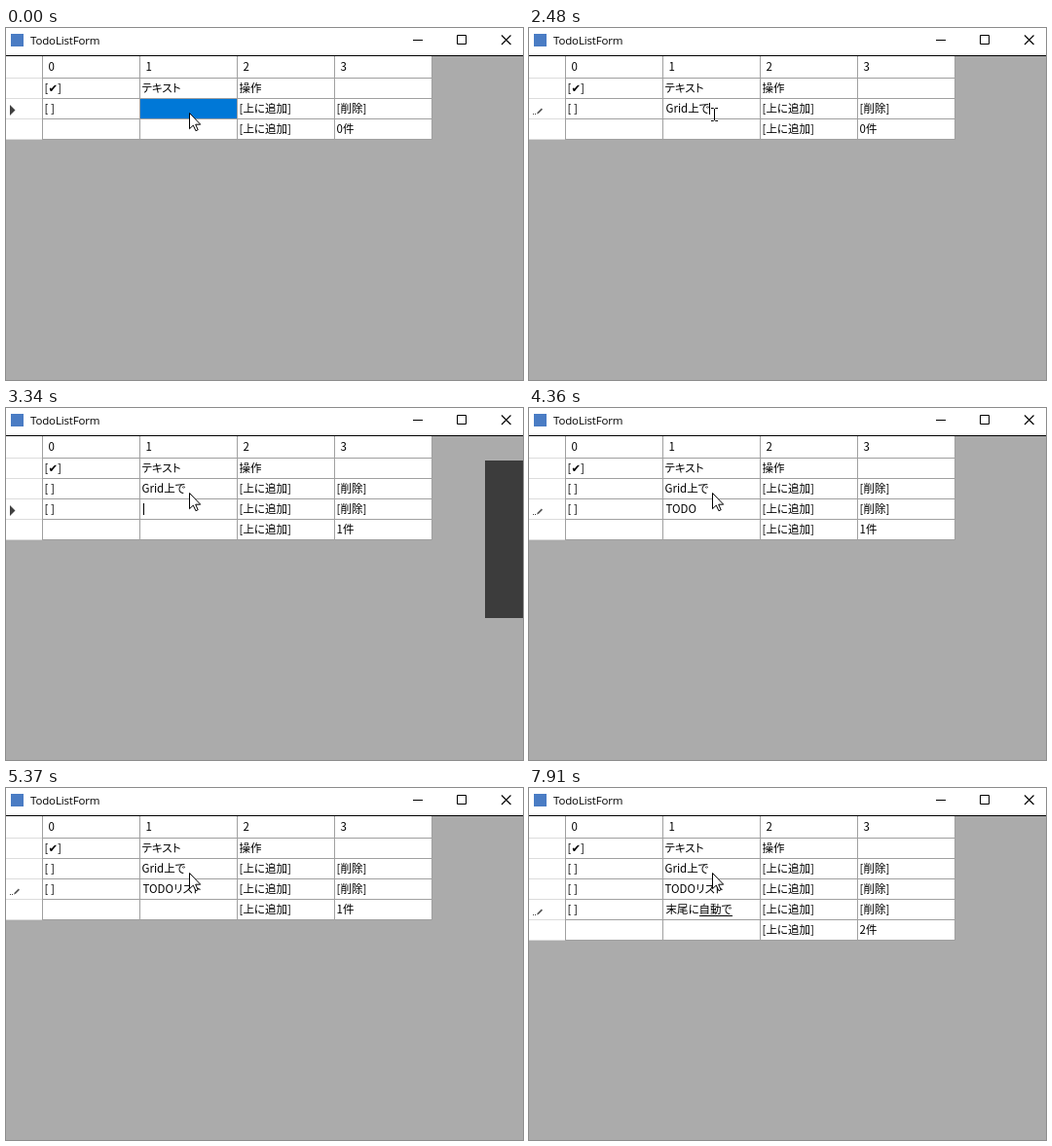
An HTML page for the animation above (7.99 s loop, 531 by 362 pixels).

```html
<!DOCTYPE html>
<html lang="ja">
<head>
<meta charset="utf-8">
<style>
  html, body { margin: 0; height: 100%; overflow: hidden; background: #ababab; }
  svg { display: block; }
  text {
    font: 11.5px "Noto Sans CJK JP", "Noto Sans CJK", "DejaVu Sans", sans-serif;
    font-feature-settings: "palt";
    white-space: pre;
  }
  .title { font: 11.5px "Open Sans", "Noto Sans", sans-serif; letter-spacing: -.15px; }
  rect { shape-rendering: crispEdges; }
</style>
</head>
<body>
<svg width="531" height="362" viewBox="0 0 531 362">
  <rect width="531" height="28" fill="#fff"/>
  <rect y="28" width="531" height="1" fill="#000"/>
  <rect x="5" y="6" width="13" height="13" fill="#4a7cc4"/>
  <text class="title" x="25" y="17">TodoListForm</text>
  <g fill="none" stroke="#000">
    <path d="M418 12.5h10M463.5 7.5h9v9h-9z"/>
    <path d="M509 7.5l9.5 9.5m0-9.5l-9.5 9.5" stroke-width="1.1"/>
  </g>
  <g id="grid"></g>
  <g id="editor"></g>
  <rect id="panel" x="492" y="54" width="39" height="162" fill="#3c3c3c"/>
  <path id="arrow" d="M188.5 87.5v16.2l3.8-3.6 2.6 5.6 2.3-1-2.5-5.5h5z" fill="#fff" stroke="#000"/>
  <path id="beam" d="M187 82.5h2.5l1 1 1-1h2.5M190.5 83v12M187 95.5h2.5l1-1 1 1h2.5" fill="none" stroke="#000"/>
</svg>
<script>
const LOOP = 7990, ROW = 21, TOP = 52;
const items = ["Grid上で", "TODOリスト"];
const $ = id => document.getElementById(id);

// Each step changes part of the state; the rest carries over.
const newRow = row => ({ row, editing: false, text: "", comp: "", caret: false, pen: false, pointer: "arrow" });
const comp = comp => ({ comp, caret: false });
const commit = (text, caret = false) => ({ text, comp: "", caret, pen: true });
const steps = [
  [0, { ...newRow(0), panel: 0 }],
  [150, { editing: true }],
  [230, { caret: true, pointer: "beam" }],
  [760, comp("g")],
  [850, comp("G")],
  [1000, comp("Gr")],
  [1160, comp("Grid")],
  [1400, { caret: true }],
  [1630, commit("Grid")],
  [2010, comp("u")],
  [2090, comp("う")],
  [2180, comp("うえ")],
  [2330, comp("上")],
  [2400, comp("上で")],
  [2480, commit("Grid上で", true)],
  [2880, newRow(1)],
  [3260, { editing: true, panel: .5 }],
  [3340, { caret: true, panel: 1 }],
  [3580, { ...commit("T", true), pointer: "" }],
  [3660, commit("TO", true)],
  [3740, commit("TOD", true)],
  [3820, commit("TODO", true)],
  [3970, { pointer: "arrow", panel: .7 }],
  [4050, { panel: .35 }],
  [4130, { panel: 0 }],
  [4360, { caret: false }],
  [4660, { panel: .5 }],
  [4740, { ...comp("r"), panel: 1 }],
  [4820, comp("り")],
  [4900, comp("りs")],
  [4980, comp("りす")],
  [5060, comp("りすt")],
  [5140, comp("りすと")],
  [5220, { ...comp("リスト"), panel: .7 }],
  [5290, { panel: .35 }],
  [5370, { ...commit("TODOリスト"), panel: 0 }],
  [5520, newRow(2)],
  [6450, { editing: true, comp: "ま" }],
  [6530, comp("ま")],
  [6680, comp("まt")],
  [6750, comp("まつ")],
  [6830, comp("まつび")],
  [7000, comp("まつびに")],
  [7080, comp("末尾に")],
  [7230, commit("末尾に")],
  [7540, comp("じ")],
  [7610, comp("じど")],
  [7770, comp("じどう")],
  [7840, comp("じどうで")],
  [7910, comp("自動で")],
];
let last = {};
const states = steps.map(([time, change]) => last = { ...last, ...change, time });

const rect = (x, y, w, h, fill) => `<rect x="${x}" y="${y}" width="${w}" height="${h}" fill="${fill}"/>`;
const label = (x, y, s) => `<text x="${x}" y="${y}">${s}</text>`;
const rowTop = i => TOP + ROW * i;

function cells(i, values) {
  return values.map((s, col) => label(39.5 + 100 * col, rowTop(i) + 14, s)).join("");
}

function drawGrid({ row, pen }) {
  const bottom = rowTop(row + 3);
  let out = rect(0, 29, 438, bottom - 29, "#fff");
  for (let y = 51; y < bottom; y += ROW)
    out += rect(0, y, 37, 1, "#dcdcdc") + rect(37, y, 401, 1, "#a0a0a0");
  for (let col = 0; col < 5; col++) {
    out += rect(37 + 100 * col, 29, 1, bottom - 29, "#a0a0a0");
    if (col < 4) out += label(43.5 + 100 * col, 44, col);
  }
  out += cells(0, ["[✔]", "テキスト", "操作", ""]);
  for (let i = 0; i <= row; i++)
    out += cells(i + 1, ["[ ]", i < row ? items[i] : "", "[上に追加]", "[削除]"]);
  out += cells(row + 2, ["", "", "[上に追加]", row + "件"]);
  const mark = pen
    ? `<path d="M4 15.5h1m1 0h1" stroke="#444"/><path d="M8 15.5l2-.8 4-4-1.2-1.2-4 4z" fill="#555"/>`
    : `<path d="M4 6l5.5 5.5L4 17z" fill="#404040"/>`;
  $("grid").innerHTML = out + `<g transform="translate(0 ${rowTop(row + 1)})">${mark}</g>`;
}

function drawEditor(s) {
  const y = rowTop(s.row + 1), editor = $("editor");
  if (!s.editing) {
    editor.innerHTML = rect(138, y, 99, 20, "#0078d7");
    return;
  }
  const x = 140.5, whole = s.text + s.comp;
  editor.innerHTML = label(x, y + 14, whole);
  const text = editor.firstChild;
  const start = s.text ? text.getSubStringLength(0, s.text.length) : 0;
  const width = whole ? text.getComputedTextLength() : 0;
  let extra = "";
  if (s.comp) extra += rect(Math.round(x + start), y + 16, Math.round(width - start), 1, "#000");
  if (s.caret) extra += rect(Math.floor(x + .5 + width), y + 4, s.comp ? 2 : 1, s.comp ? 14 : 12, "#000");
  editor.insertAdjacentHTML("beforeend", extra);
}

let shown;
function frame() {
  const t = performance.now() % LOOP;
  const state = states.findLast(s => s.time <= t);
  if (state !== shown) {
    shown = state;
    drawGrid(state);
    drawEditor(state);
    $("panel").setAttribute("opacity", state.panel);
    for (const id of ["arrow", "beam"])
      $(id).setAttribute("visibility", state.pointer === id ? "visible" : "hidden");
  }
  requestAnimationFrame(frame);
}
frame();
</script>
</body>
</html>
```
